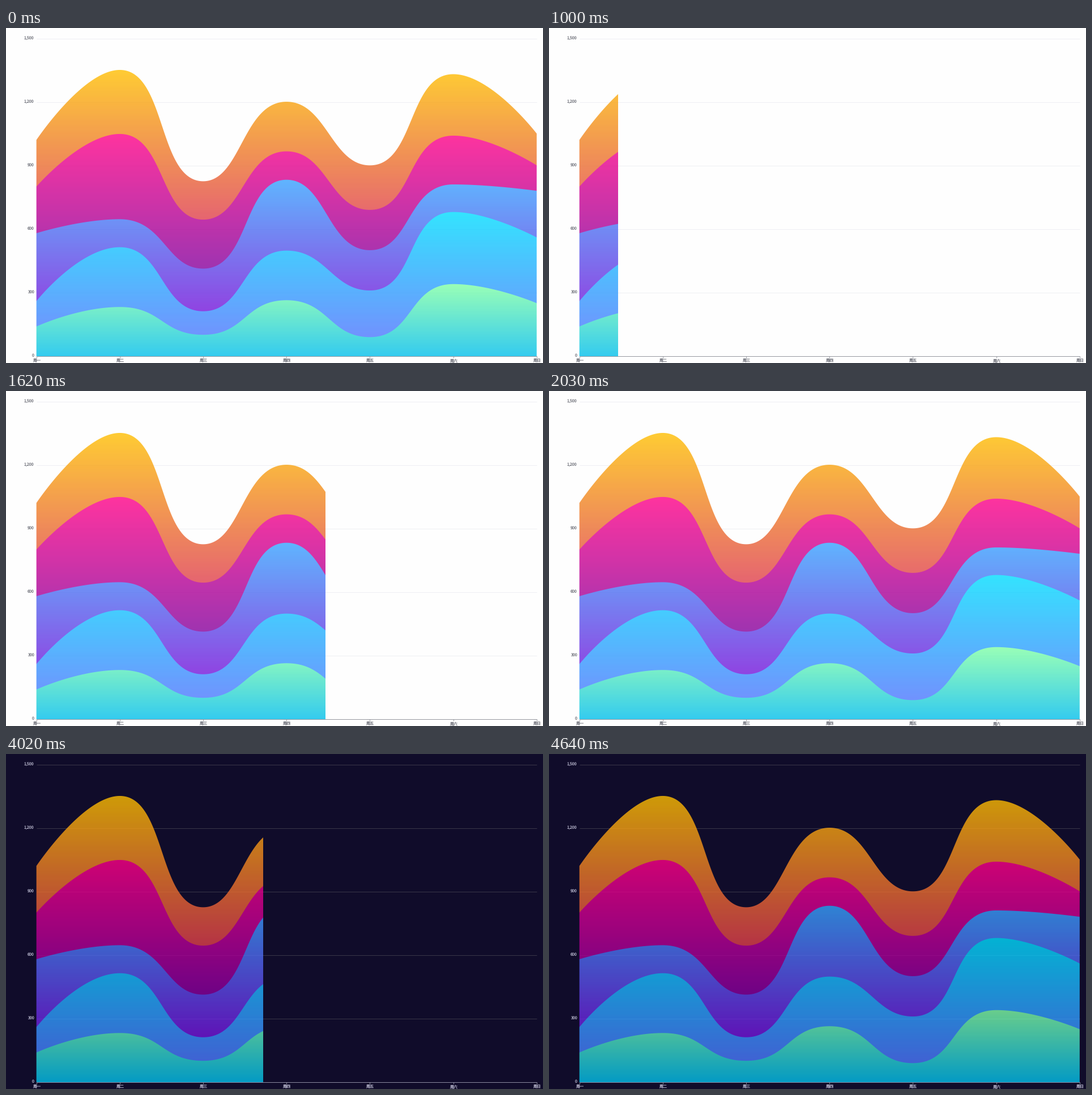
A matplotlib script that plays this animation: 948x591 px, repeating every 6.25 s.

```python
import numpy as np
import matplotlib.pyplot as plt
from matplotlib.animation import FuncAnimation

W, H, DPI = 948, 591, 128
PX = 72 / DPI                      # points per pixel
X0, X1, BASE, UNIT = 53.7, 936.8, 579.0, 0.3741
STEP, LOOP = 125, 6250
DARK_AT = 3625

DAYS = "一二三四五六日"
VALUES = [
    [140, 232, 101, 264, 90, 340, 250],
    [120, 282, 111, 234, 220, 340, 310],
    [320, 132, 201, 334, 190, 130, 220],
    [220, 402, 231, 134, 190, 230, 120],
    [220, 302, 181, 234, 210, 290, 150],
]
FILLS = [
    ((128, 255, 165), (1, 191, 236)),
    ((0, 221, 255), (77, 119, 255)),
    ((55, 162, 255), (116, 21, 219)),
    ((255, 0, 135), (135, 0, 157)),
    ((255, 191, 0), (224, 62, 76)),
]
OPACITY = 0.8
LIGHT = dict(back="#fefefe", grid="#eeeff3", axis="#96989f", text="#6e7079")
DARK = dict(back="#100c2a", grid="#393648", axis="#8b8aa0", text="#b9b8ce")

# Time and right edge of the reveal.
LIGHT_SWEEP = ([1000, 1375, 1500, 1625, 1750, 1875, 2000],
               [122, 462, 564, 667, 787, 907, 937])
DARK_SWEEP = ([3625, 4000, 4125, 4500, 4625], [113, 454, 572, 908, 937])

SUB = 6                            # samples per pixel column
xs = (np.arange(W * SUB) + 0.5) / SUB
rows = np.arange(H)[:, None]


def smooth_curve(pts, smooth=0.5):
    """Length-weighted bezier spline without overshoot, sampled on xs."""
    t = np.linspace(0, 1, 120)[:, None]
    out, c0 = [], pts[0]
    for k in range(1, len(pts)):
        prev, p = pts[k - 1], pts[k]
        c1, c2 = p, p
        if k + 1 < len(pts):
            nxt = pts[k + 1]
            a, b = np.hypot(*(p - prev)), np.hypot(*(nxt - p))
            c2 = p + (nxt - prev) * smooth * b / (a + b)
            c2 = np.clip(c2, np.minimum(nxt, p), np.maximum(nxt, p))
            c1 = p - (c2 - p) * a / b
            c1 = np.clip(c1, np.minimum(prev, p), np.maximum(prev, p))
            c2 = p + (p - c1) * b / a
        out.append((1 - t) ** 3 * prev + 3 * (1 - t) ** 2 * t * c0
                   + 3 * (1 - t) * t ** 2 * c1 + t ** 3 * p)
        c0 = c2
    x, y = np.vstack(out).T
    return np.interp(xs, x, y)


def below(curve):
    """Share of each pixel that lies under the curve, within the plot."""
    share = np.clip(rows + 1 - curve, 0, 1) * ((xs >= X0) & (xs <= X1))
    return share.reshape(H, W, SUB).mean(axis=2)


def gradient(top, bottom, colors):
    t = np.clip((rows + 0.5 - top) / (bottom - top), 0, 1)
    first, last = np.array(colors) / 255
    return (first + (last - first) * t)[:, None, :]


def paint_areas(ticks):
    lower = np.full_like(xs, BASE)
    under = below(lower)
    rgb, cover = np.zeros((H, W, 3)), np.zeros((H, W, 1))
    for total, colors in zip(np.cumsum(VALUES, axis=0), FILLS):
        upper = smooth_curve(np.column_stack([ticks, BASE - UNIT * total]))
        filled = below(upper)
        share = (filled - under)[..., None]
        rgb += share * gradient(upper.min(), lower.max(), colors)
        cover += share
        lower, under = upper, filled
    rgb /= np.maximum(cover, 1e-6)
    rgba = np.concatenate([rgb, cover * OPACITY], axis=2)
    return np.uint8(np.clip(rgba, 0, 1) * 255 + 0.5)


plt.rcParams["font.family"] = "Noto Sans CJK JP"
plt.rcParams["text.hinting"] = "none"
fig = plt.figure(figsize=(W / DPI, H / DPI), dpi=DPI)
ax = fig.add_axes([0, 0, 1, 1])
ax.axis("off")

ticks_x = np.linspace(X0, X1, len(DAYS))
grid_lines, axis_lines, labels = [], [], []


def line(x, y, group):
    group += ax.plot(x, y, lw=PX, solid_capstyle="butt", zorder=1)


def label(x, y, text, align):
    labels.append(ax.text(x, y, text, size=7 * PX, ha=align, va="baseline", zorder=4))


for k in range(6):
    y = 578.5 - 112 * k
    line([X0, X1], [y, y], grid_lines if k else axis_lines)
    label(49.3, y + 1.6, f"{300 * k:,}", "right")
for x, day in zip(ticks_x, DAYS):
    line([x, x], [579, 582], axis_lines)
    label(x, 589.1, "周" + day, "center")

areas = paint_areas(ticks_x)
image = ax.imshow(areas, extent=(0, W, H, 0), aspect="auto",
                  interpolation="nearest", zorder=2)
ax.set_xlim(0, W)
ax.set_ylim(H, 0)


def sweep_edge(t):
    if t < LIGHT_SWEEP[0][0]:
        return W
    return int(round(np.interp(t, *(DARK_SWEEP if t >= DARK_AT else LIGHT_SWEEP))))


def update(i):
    t = i * STEP
    theme = DARK if t >= DARK_AT else LIGHT
    fig.set_facecolor(theme["back"])
    for group, key in ((grid_lines, "grid"), (axis_lines, "axis"), (labels, "text")):
        for artist in group:
            artist.set_color(theme[key])
    shown = areas.copy()
    shown[:, sweep_edge(t):, 3] = 0
    image.set_data(shown)
    return []


anim = FuncAnimation(fig, update, frames=LOOP // STEP, interval=STEP,
                     repeat=True, repeat_delay=0, blit=False)
plt.show()
```
